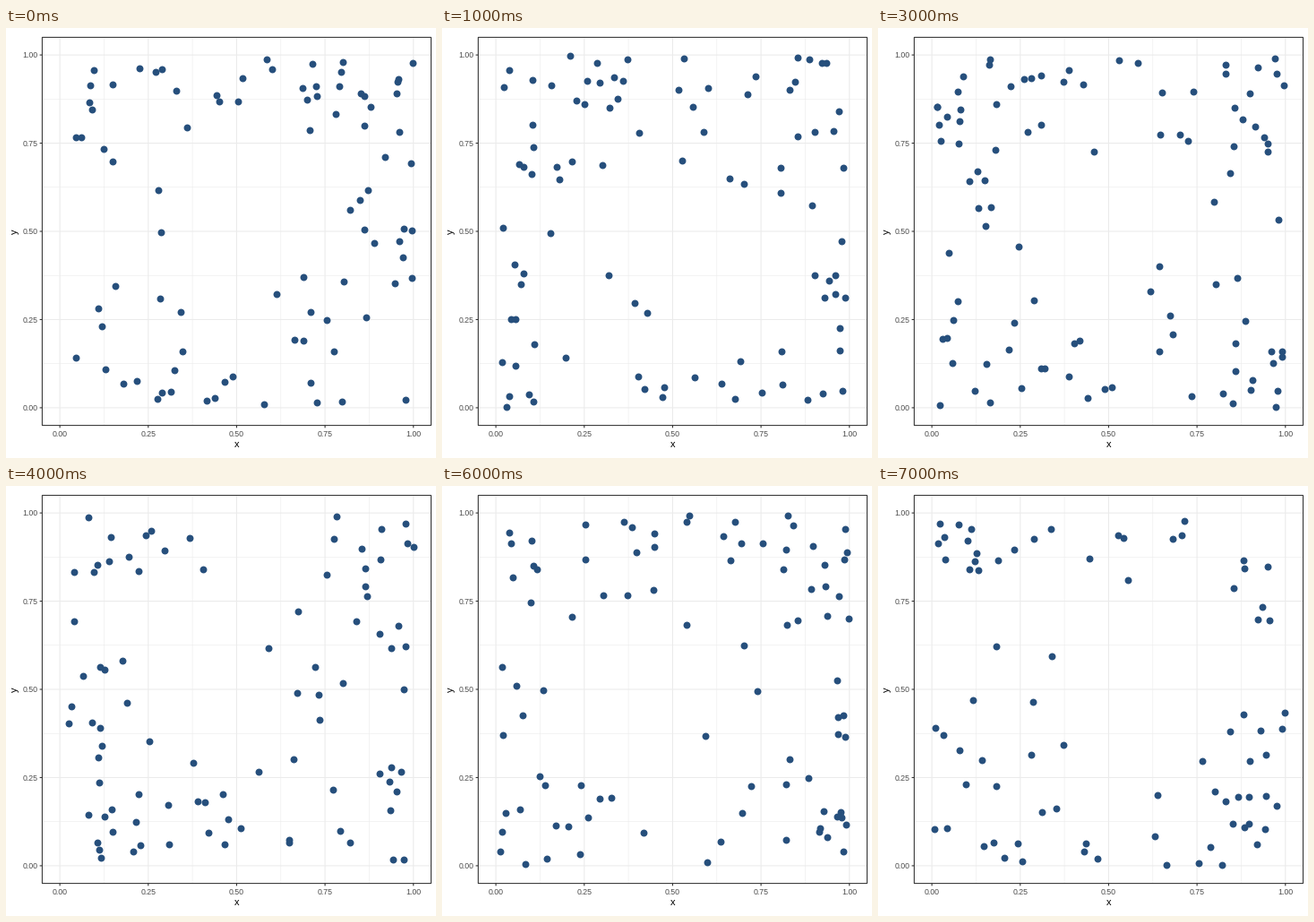
A matplotlib script that plays this animation: 480 px wide and 480 px high, repeating every 8 s.

```python
import numpy as np
import matplotlib.pyplot as plt
from matplotlib.animation import FuncAnimation
from matplotlib.patches import Rectangle

SIZE, DPI = 480, 80
PX = 72 / DPI                      # points per pixel
LEFT, TOP, RIGHT, BOTTOM = 40.4, 10.4, 474.5, 443.6
COUNTS = [86, 90, 81, 98, 88, 90, 88, 78]

plt.rcParams["font.family"] = "Liberation Sans"


def to_x(v):
    return LEFT + (RIGHT - LEFT) * (v + 0.05) / 1.1


def to_y(v):
    return BOTTOM - (BOTTOM - TOP) * (v + 0.05) / 1.1


def cloud(step):
    """Points in the unit square, denser with squared distance from the middle."""
    rng = np.random.default_rng(100 + step)
    pts = rng.random((600, 2))
    keep = rng.random(600) < 2 * ((pts - 0.5) ** 2).sum(axis=1)
    return pts[keep][:COUNTS[step]]


fig = plt.figure(figsize=(SIZE / DPI, SIZE / DPI), dpi=DPI, facecolor="white")
ax = fig.add_axes([0, 0, 1, 1])
ax.set_xlim(0, SIZE)
ax.set_ylim(SIZE, 0)
ax.axis("off")


def line(xs, ys, color, width, z):
    ax.plot(xs, ys, color=color, lw=width * PX, zorder=z,
            solid_capstyle="butt", snap=False)


def label(x, y, text, size, color, ha="center", angle=0):
    ax.text(x, y, text, fontsize=size * PX, color=color, ha=ha,
            va="baseline", rotation=angle, rotation_mode="anchor")


def grid(v, width, z):
    line([to_x(v)] * 2, [TOP, BOTTOM], "#ebebeb", width, z)
    line([LEFT, RIGHT], [to_y(v)] * 2, "#ebebeb", width, z)


for v in (0.125, 0.375, 0.625, 0.875):
    grid(v, 0.55, 1)

for v in (0, 0.25, 0.5, 0.75, 1):
    x, y = to_x(v), to_y(v)
    grid(v, 1.07, 2)
    line([x, x], [BOTTOM, BOTTOM + 2.75], "#333333", 1.07, 4)
    line([LEFT - 2.75, LEFT], [y, y], "#333333", 1.07, 4)
    label(x, 456.2, f"{v:.2f}", 8.8, "#4d4d4d")
    label(35.5, y + 3.2, f"{v:.2f}", 8.8, "#4d4d4d", ha="right")

label((LEFT + RIGHT) / 2, 468, "x", 11, "black")
label(13, (TOP + BOTTOM) / 2, "y", 11, "black", angle=90)

ax.add_patch(Rectangle((LEFT, TOP), RIGHT - LEFT, BOTTOM - TOP, fill=False,
                       ec="#333333", lw=1.07 * PX, zorder=4, snap=False))
dots = ax.scatter([], [], s=(7.9 * PX) ** 2, color="#264f7c",
                  linewidths=0, zorder=3)


def draw(step):
    pts = cloud(step)
    dots.set_offsets(np.column_stack([to_x(pts[:, 0]), to_y(pts[:, 1])]))
    return (dots,)


anim = FuncAnimation(fig, draw, frames=len(COUNTS), interval=1000,
                     init_func=lambda: draw(0), repeat=True, repeat_delay=0)
plt.show()
```
